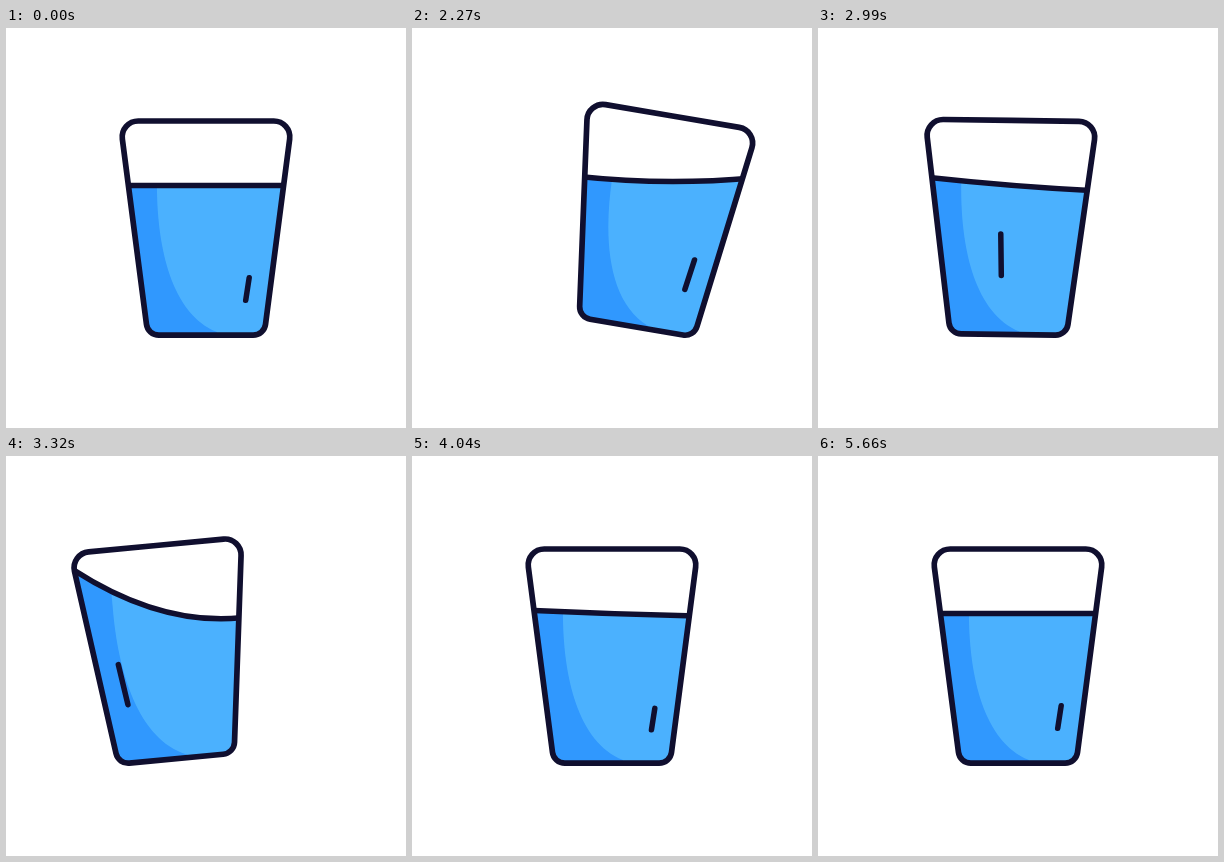
Recreate the animation shown at these times as an HTML page with a canvas. Size 400 by 400 pixels, loop 5690 ms.

```html
<!DOCTYPE html>
<html lang="en">
<head>
<meta charset="utf-8">
<title>Glass of water</title>
<style>
  html, body { margin: 0; width: 100%; height: 100%; overflow: hidden; background: #fff; }
  canvas { display: block; }
</style>
</head>
<body>
<canvas id="stage" width="400" height="400"></canvas>
<script>
const ctx = document.getElementById('stage').getContext('2d');
const LOOP = 5690, HOLD = 2030, STEP = 30;
const INK = '#100f2f', WATER = '#4bb1fe', SHADE = '#3098fe';

const smooth = p => (1 - Math.cos(Math.PI * p)) / 2;
const brisk = p => 0.65 * smooth(p) + 0.35 * p;
const out = p => Math.sin(Math.PI / 2 * p);

// Keys are [time, value, easing into this key].
const tilt = [[2005, 0], [2600, 15, out], [3240, -7, brisk], [3640, 5, brisk], [4020, 0]];
const slide = [[2005, 0], [2600, 66, out], [3240, -48.7, brisk], [3640, 18.5, brisk], [4020, 0]];
const slosh = [[2005, 0], [2600, 1], [3300, -1], [3720, 0.35], [4150, -0.17],
               [4600, 0.11], [5060, -0.06], [5450, 0]];
const glintSide = [[2600, 1], [3300, -1], [3760, 1]];
const glintStretch = [[2005, 0], [2600, 1], [3300, 0.94], [3720, 0.3], [4040, -0.06], [4600, 0]];

function valueAt(keys, t) {
  if (t <= keys[0][0]) return keys[0][1];
  for (let i = 1; i < keys.length; i++) {
    const [t0, v0] = keys[i - 1], [t1, v1, ease = smooth] = keys[i];
    if (t < t1) return v0 + (v1 - v0) * ease((t - t0) / (t1 - t0));
  }
  return keys[keys.length - 1][1];
}

// All shapes are relative to the centre of the glass.
const glass = new Path2D();
glass.moveTo(0, -107);
glass.arcTo(86, -107, 58.1, 107.2, 16);
glass.arcTo(58.1, 107.2, -58.1, 107.2, 12.5);
glass.arcTo(-58.1, 107.2, -86, -107, 12.5);
glass.arcTo(-86, -107, 0, -107, 16);
glass.closePath();

const shade = new Path2D('M-49-100V-50C-50 15-36 85 11 104V110H-90V-100Z');

function surfacePath(s) {
  const reach = 90, u = reach / 78, size = Math.abs(s);
  const middle = -42.4 + 2.8 * size + 1.8 * s;
  const lift = (11 * s * s + 4 * size) / 2 * u * u;
  const lean = 29.5 * s * u;
  const path = new Path2D();
  path.moveTo(-reach, middle - 2 * lift + lean);
  path.quadraticCurveTo(0, middle + 2 * lift, reach, middle - 2 * lift - lean);
  return path;
}

function drawWater(s) {
  const surface = surfacePath(s);
  const body = new Path2D(surface);
  body.lineTo(90, 110);
  body.lineTo(-90, 110);
  body.closePath();

  ctx.save();
  ctx.clip(glass);
  ctx.save();
  ctx.clip(body);
  ctx.fillStyle = WATER;
  ctx.fillRect(-100, -120, 200, 240);
  ctx.fillStyle = SHADE;
  ctx.fill(shade);
  ctx.restore();
  ctx.lineWidth = 5.5;
  ctx.stroke(surface);
  ctx.restore();
}

function drawGlint(side, k) {
  ctx.lineWidth = 5.5;
  ctx.beginPath();
  ctx.moveTo(side * (43.2 + 6.5 * k), 49.7 - 44.5 * k);
  ctx.lineTo(side * (39.7 + 4 * k), 72.3 - 25 * k);
  ctx.stroke();
}

function draw(t) {
  const angle = valueAt(tilt, t) * Math.PI / 180;
  // Keeps the lowest rounded corner on the ground.
  const rise = 95 * (1 - Math.cos(angle)) - 47 * Math.abs(Math.sin(angle));

  ctx.fillStyle = '#fff';
  ctx.fillRect(0, 0, 400, 400);
  ctx.save();
  ctx.translate(200 + valueAt(slide, t), 200 + rise);
  ctx.rotate(angle);
  ctx.strokeStyle = INK;
  ctx.lineCap = ctx.lineJoin = 'round';
  drawWater(valueAt(slosh, t));
  drawGlint(valueAt(glintSide, t), valueAt(glintStretch, t));
  ctx.lineWidth = 5.7;
  ctx.stroke(glass);
  ctx.restore();
}

function tick() {
  const t = performance.now() % LOOP;
  draw(t < HOLD ? 0 : HOLD + Math.floor((t - HOLD) / STEP) * STEP);
  requestAnimationFrame(tick);
}
tick();
</script>
</body>
</html>
```
